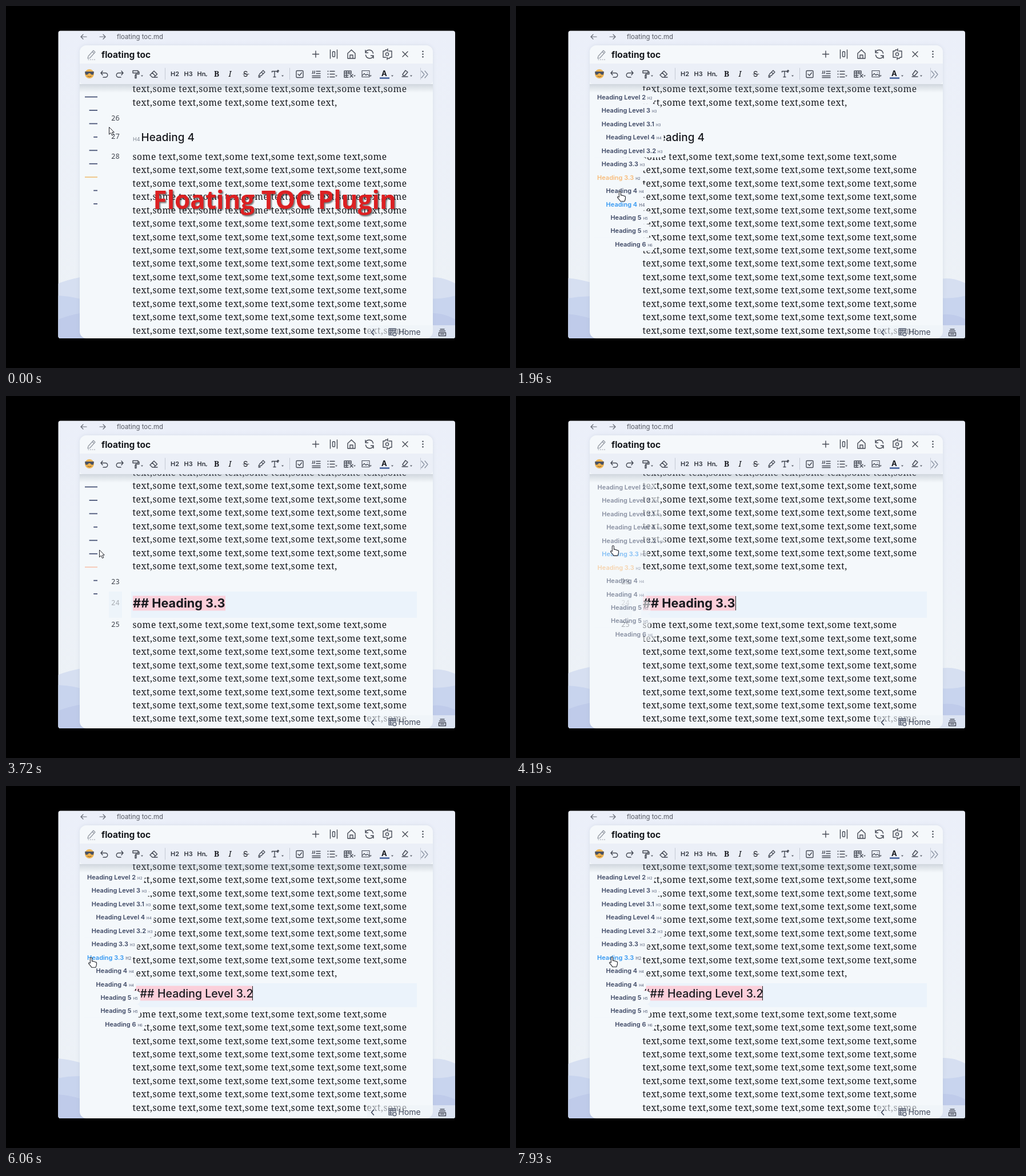
Recreate the animation shown at these times as an HTML page. Size 882 px wide and 635 px high, loop 8 s.

```html
<!DOCTYPE html>
<html lang="en">
<head>
<meta charset="utf-8">
<title>Floating TOC</title>
<style>
  html, body { margin: 0; width: 100%; height: 100%; overflow: hidden; background: #000; }
  svg { display: block; width: 882px; height: 635px; }
  text { font-family: Inter, sans-serif; fill: #17191e; white-space: pre; }
  .body { font: 15.6px "Noto Serif", serif; letter-spacing: .54px; }
  .num { font: 12.4px "Noto Sans Mono", monospace; fill: #41464f; }
  .dim { fill: #aaaeb4; }
  .h2 { font-size: 21.7px; font-weight: 700; }
  .h3 { font-size: 19.5px; font-weight: 500; }
  .h4 { font-size: 19px; font-weight: 500; }
  .tag { font-size: 9px; fill: #7b828e; }
  .icons { fill: none; stroke: #454a55; stroke-width: 1.4; stroke-linecap: round; stroke-linejoin: round; }
  .tool { font-size: 11px; font-weight: 600; fill: #30353e; }
  .serif { font-family: "Noto Serif", serif; }
  .label { font-size: 11px; font-weight: 600; }
  .title { font: 700 44px "Open Sans", sans-serif; fill: #dc2022; filter: drop-shadow(2px 2px 1.2px rgba(40, 40, 40, .65)); }
</style>
</head>
<body>
<svg viewBox="0 0 882 635">
  <defs>
    <linearGradient id="sky" x2="0" y2="1"><stop stop-color="#ebeff9"/><stop offset="1" stop-color="#edf2f6"/></linearGradient>
    <linearGradient id="shade" x2="0" y2="1"><stop stop-color="#8590a0" stop-opacity=".32"/><stop offset="1" stop-color="#8590a0" stop-opacity="0"/></linearGradient>
    <clipPath id="win"><rect x="91.500" y="43.500" width="694.500" height="539.500" rx="4"/></clipPath>
    <clipPath id="page"><path d="M129 137H747V571a12 12 0 0 1-12 12H141a12 12 0 0 1-12-12Z"/></clipPath>
    <filter id="soft" x="-5%" y="-5%" width="110%" height="110%"><feGaussianBlur stdDeviation="3"/></filter>
  </defs>
  <rect width="882" height="635"/>
  <g clip-path="url(#win)">
    <rect x="91" y="43" width="696" height="541" fill="url(#sky)"/>
    <g id="waves"></g>
    <rect x="129" y="69" width="618" height="514" rx="12" fill="#a9b4c8" opacity=".3" filter="url(#soft)"/>
    <rect x="129" y="69" width="618" height="514" rx="12" fill="#f4f8fb"/>
    <g clip-path="url(#page)">
      <g id="views"></g>
      <g id="toc"></g>
      <rect x="129" y="137" width="618" height="15" fill="url(#shade)"/>
    </g>
    <path d="M129 101H747V131a6 6 0 0 1-6 6H135a6 6 0 0 1-6-6Z" fill="#ebeff7"/>
    <path d="M129 101V81a12 12 0 0 1 12-12H735a12 12 0 0 1 12 12V101Z" fill="#f5f8fb"/>
    <path d="M632 583V567a7 7 0 0 1 7-7H786V583Z" fill="#eff3f9" opacity=".6"/>

    <g class="icons">
      <g stroke="#666b76" stroke-width="1.2">
        <path d="M141 54h-10m4-4-4 4 4 4M164 54h10m-4-4 4 4-4 4"/>
        <path stroke="#9298a2" d="m143 92 1-4 9-10 3 3-9 10-4 1m8-12 3 3"/>
        <path stroke="#9298a2" stroke-dasharray="1 2.5" d="M144 94h13"/>
      </g>
      <path d="M536.500 84.500h11m-5.500-5.500v11"/>
      <path d="M567.500 77v15m12-15v15"/><rect x="571.500" y="80" width="4" height="9" rx="1"/>
      <path d="M598 83l6.500-6 6.500 6v9h-13Zm4 9v-6h5v6"/>
      <path d="M629 77.500v4.500h4.500M629 82a7 7 0 0 1 13.500 1M643 91.500V87h-4.500M643 87a7 7 0 0 1-13.500-1"/>
      <path d="M665 90h-5v-11h3l1-2h4m2 2h5v11h-3l-1 2h-4m0-2v4m1-19v4"/><circle cx="667" cy="84.500" r="2.600"/>
      <path d="m694 80 9 9m0-9-9 9"/>
      <path stroke-width="2.600" d="M729.500 79.800v.01m0 4.700v.01m0 4.700v.01"/>

      <path d="m169 114-3 3.500 3 3.500m-3-3.500h8a3.700 3.700 0 0 1 0 7.500h-4M202 114l3 3.500-3 3.500m3-3.500h-8a3.700 3.700 0 0 0 0 7.500h4"/>
      <path d="M222 113.500h9v4h-9Zm9 2h2v4h-6v2m-1 0h2v5h-2Z"/>
      <path d="m252 121 7-7 5.500 5.500-5.500 5.500h-3Zm4-4 5 5.500m-2 2.500h6"/>
      <path stroke="#c3c9d4" stroke-width="1" d="M278.500 109v20M496.500 109v20M725.500 109v20"/>
      <path d="m442 123 2-4 6-6 3 3-6 6-3 1Zm5-7 3 3m-8 6h3"/>
      <rect x="508" y="113.500" width="12" height="12" rx="1.500"/><path d="m511 119.500 2.500 2.500 4-5"/>
      <path d="M543 114.500h7m-7 4h7m-14 4h14m-14 3h14M537 114v3l-1 1.500m4-4.500v3l-1 1.500"/>
      <path d="M567 114.500h8m-8 5h8m-8 5h8"/><path stroke-width="2" d="M563.500 114.500v.01m0 5v.01m0 5v.01"/>
      <path d="M604 119v-5h-12v11h7m-7-7.500h12m-12 4h7m-3-7.500v11m4-11v5m2 1 5 5m0-5-5 5"/>
      <path stroke-width="1.100" d="M623 113.500h13v11h-13Zm0 9 4-4 3 3 2-2 4 3M632.500 116.500h.1"/>
      <path d="m694 120 5-7 4 3-5 6h-3Zm-1 4h10"/>
      <path stroke="#8d95a5" d="m727 114 5 6-5 6m6-12 5 6-5 6"/>
      <path stroke="#3e5c9a" stroke-width="2.600" stroke-linecap="butt" d="M654 126.500h17"/>
      <path stroke-width="1.200" d="M415 119.500h10"/>
      <path d="M465.500 116v-1.500h9v1.500m-4.500-1.500v10m-2 0h4m4-8v-4m-1.500 1.500 1.500-1.500 1.500 1.500"/>
      <path stroke="#3e465c" stroke-width="1.600" d="m643.500 568-4 4.500 4 4.500"/>
      <path stroke="#596174" d="M682 571v-5h-12v11h6m-6-7.500h12m-12 4h6m-3-7.500v11m4-11v5"/>
      <circle cx="680" cy="575.500" r="3" stroke="#596174"/>
      <path d="M760 567h7m-8.500 3h10m-11 3h12v5.500h-12Zm3 2.500h6"/>
    </g>
    <g id="carets" fill="#5b606b"></g>
    <circle cx="146" cy="119" r="8" fill="#efb452"/>
    <path d="M138 115h16l-1 5q-3 2-6-2h-2q-3 4-6 2Z" fill="#4b5364"/>
    <path d="M142.500 123q3.500 2.500 7 0" fill="none" stroke="#81562c"/>
    <text x="194" y="58.300" font-size="11.400" style="fill:#565a63">floating toc.md</text>
    <text x="167" y="91" font-size="15.500" font-weight="700">floating toc</text>
    <text class="tool" x="288" y="123.300">H2</text><text class="tool" x="311.500" y="123.300">H3</text><text class="tool" x="334.500" y="123.300">Hn</text>
    <text class="serif" x="364" y="124" font-size="13.500" font-weight="700">B</text>
    <text class="serif" x="389.500" y="124" font-size="13.500" font-style="italic">I</text>
    <text x="415" y="124" font-size="13">S</text>
    <text x="657" y="122.500" font-size="13" font-weight="700">A</text>
    <text x="686.500" y="577" font-size="14" style="fill:#454c5d">Home</text>
    <text id="title" class="title" x="257.500" y="356">Floating TOC Plugin</text>
    <g id="cursor" fill="#fff" stroke="#20232a" stroke-linejoin="round">
      <path id="arrow" d="M.5.500V13.200l3-2.800 2 4.600 2.300-1-2-4.500H9.300Z"/>
      <path id="hand" transform="scale(1.080)" d="M-1.500 1.600a1.400 1.400 0 0 1 2.800 0V6.500l1-.4 1.800.9 1-.2 1.500 1 1-.1q1.500.4 1.300 2.600-.1 3.200-1.600 6.200H1Q-1.400 13-4 10.200q-.6-2.400 2.500-.8Z"/>
    </g>
  </g>
</svg>
<script>
const LOOP = 8000, STEP = 23.45, JUMP1 = 2680, JUMP2 = 4560, BLINK = 530;
const $ = id => document.getElementById(id);

function add(parent, tag, attrs, content) {
  const el = document.createElementNS(parent.namespaceURI, tag);
  for (const k in attrs) el.setAttribute(k, attrs[k]);
  if (content) el.textContent = content;
  return parent.appendChild(el);
}
const show = (el, on) => el.setAttribute('visibility', on ? 'visible' : 'hidden');
const ramp = (t, a, b) => Math.min(1, Math.max(0, (t - a) / (b - a)));
const mix = (a, b, u) => a.map((v, i) => v + (b[i] - v) * u);
const smooth = u => u * u * (3 - 2 * u);
const outBack = u => 1 + 2.7 * (u - 1) ** 3 + 1.7 * (u - 1) ** 2;

// Document
const FULL = 'text,some '.repeat(6).trim();
const OPENING = 'some text,'.repeat(5) + 'some';
const ENDING = 'text,some '.repeat(4) + 'text,';

function lines(view, y, count, first, last) {
  for (let i = 0; i < count; i++) {
    const str = i === 0 && first || i === count - 1 && last || FULL;
    add(view, 'text', { class: 'body', x: 221.5, y: y + 5 + i * STEP }, str);
  }
}
function number(view, y, n, dim) {
  add(view, 'text', { class: dim ? 'num dim' : 'num', x: 184, y: y + 4.5 }, n);
}
function pink(view, x, width) {
  return add(view, 'rect', { x, y: 350.5, width, height: 26, fill: '#fbcfda' });
}
function activeLine(view, y, height) {
  add(view, 'rect', { x: 180, y, width: 23, height, fill: '#edf4fa' });
  add(view, 'rect', { x: 219, y, width: 500, height, fill: '#ebf3fb' });
}
function heading(view, cls, x, str) {
  return add(view, 'text', { class: cls, x, y: 370.5 }, str);
}
function caret(view, x) {
  return add(view, 'rect', { x, y: 351, width: 1, height: 25, fill: '#222' });
}

const views = [0, 1, 2].map(() => add($('views'), 'g', {}));
const [viewA, viewB, viewC] = views;

lines(viewA, 146.3, 2, null, ENDING);
number(viewA, 196, 26);
number(viewA, 228.5, 27);
number(viewA, 263, 28);
add(viewA, 'text', { class: 'tag', x: 222, y: 236.5 }, 'H4');
add(viewA, 'text', { class: 'h4', x: 236.5, y: 237 }, 'Heading 4');
lines(viewA, 264.8, 14, OPENING);

lines(viewB, 135, 8, null, ENDING);
activeLine(viewB, 343, 46);
pink(viewB, 222, 162);
number(viewB, 325, 23);
number(viewB, 362, 24, true);
number(viewB, 400, 25);
heading(viewB, 'h2', 222, '## Heading 3.3');
lines(viewB, 402.3, 8, OPENING);

lines(viewC, 141.6, 9, null, ENDING);
activeLine(viewC, 346, 42);
pink(viewC, 266, 166);
const hashes = [pink(viewC, 222, 44), heading(viewC, 'h3', 222, '###')];
number(viewC, 362.5, 19, true);
number(viewC, 399, 20);
heading(viewC, 'h3', 265, 'Heading Level 3.2');
lines(viewC, 400.6, 8, OPENING);

const caretB = caret(viewB, 384), caretC = caret(viewC, 431);

for (const x of [238, 350.5, 484, 578, 610, 638, 676, 709])
  add($('carets'), 'path', { d: `M${x - 2} 121.500h4l-2 2.500Z` });

// Floating table of contents
const ACTIVE = 6;
const bars = add($('toc'), 'g', {}), labels = add($('toc'), 'g', {});
const rows = [
  ['Level 2', 2], ['Level 3', 3], ['Level 3.1', 3], ['Level 4', 4], ['Level 3.2', 3], ['3.3', 3],
  ['3.3', 2], ['4', 4], ['4', 4], ['5', 5], ['5', 5], ['6', 6]
].map(([name, level], i) => {
  const y = 160 + i * STEP, x = 142 + (level - 2) * 7.8;
  const back = add(labels, 'rect', { x: 130, y: y - 11.8, height: 23.6, rx: 7, fill: '#f4f8fb' });
  const label = add(labels, 'text', { class: 'label', x, y: y + 3.9 }, 'Heading ' + name);
  const end = x + label.getComputedTextLength() + 3;
  const tag = add(labels, 'text', { x: end, y: y + 3.9 }, 'H' + level);
  back.setAttribute('width', end + 12.5 - 130);
  const bar = add(bars, 'rect', { y: y - 1.4, height: 1.8, fill: '#4a5578' });
  return { label, tag, bar, width: 22 - (level - 2) * 7.6 };
});

// Opening and closing times of the panel.
const OPEN = [[340, 2710], [3970, 4580], [5490, 9000]];
const overPanel = t => OPEN.some(([a, b]) => t >= a && t < b + 250);

function drawToc(t) {
  let alpha = 0, grow = 1, slide = 0;
  for (const [a, b] of OPEN) {
    alpha += ramp(t, a + 80, a + 320) * (1 - ramp(t, b, b + 120));
    grow += ramp(t, b + 120, b + 340) - ramp(t, a, a + 120);
    if (t >= a) slide = 24 * (outBack(ramp(t, a, a + 560)) - 1);
  }
  // The highlight follows the pointer a little late.
  const hover = overPanel(t) ? Math.round((pointer(t - 120)[1] - 160) / STEP) : -1;
  labels.setAttribute('opacity', alpha);
  labels.setAttribute('transform', `translate(${slide})`);
  rows.forEach(({ label, tag, bar, width }, i) => {
    const w = Math.max(0, width - 22 * (1 - grow));
    bar.setAttribute('x', 160 - w);
    bar.setAttribute('width', w);
    label.style.fill = i === hover ? '#3598f2' : i === ACTIVE ? '#f8bb79' : '#3c4764';
    tag.style.fill = '#4b5570';
    tag.style.fontSize = i === hover ? '7.4px' : '6.2px';
  });
  rows[ACTIVE].bar.setAttribute('fill', t < JUMP1 ? '#f0c27e' : '#f7c6b2');
}

// Background waves: four shapes, one second each, given by heights at the visible edges.
const SHAPES = [[487, 476, 476, 487], [484, 474, 482, 473], [477, 485, 478, 487], [495, 485, 490, 490]];
const waves = [['#d6dff1', 481, 1], ['#c8d4ee', 511, -.5], ['#bfcbea', 544, 1]]
  .map(([fill, base, scale]) => ({ base, scale, path: add($('waves'), 'path', { fill }) }));

function drawWaves(t) {
  const k = Math.floor(t / 1000);
  const shape = mix(SHAPES[k % 4], SHAPES[(k + 1) % 4], t / 1000 - k);
  for (const { base, scale, path } of waves) {
    const [a, b, c, d] = shape.map(y => base + (y - 481) * scale);
    path.setAttribute('d', `M91 ${a}Q110 ${(a + b) / 2 - 2} 129 ${b}L747 ${c}Q766 ${(c + d) / 2 - 6 * scale} 787 ${d}V584H91Z`);
  }
}

// Pointer stops: time, x, y
const STOPS = [
  [60, 180, 212], [660, 157, 305.5], [1560, 157, 305.5], [1800, 182, 342], [1960, 182, 325],
  [2180, 180, 301], [JUMP1, 180, 301], [3010, 178, 83], [3150, 178, 83], [3720, 163, 269.5],
  [3950, 163, 269.5], [4410, 176, 256], [5450, 176, 256], [5960, 149, 300.5], [6430, 149, 300.5],
  [7690, 168, 299.5]
];
function pointer(t) {
  const i = STOPS.findIndex(s => s[0] > t);
  if (i < 1) return STOPS.at(i).slice(1);
  const a = STOPS[i - 1], b = STOPS[i];
  return mix(a, b, smooth(ramp(t, a[0], b[0]))).slice(1);
}

function draw(t) {
  drawWaves(t);
  drawToc(t);
  const current = (t >= JUMP1) + (t >= JUMP2);
  views.forEach((v, i) => v.setAttribute('display', i === current ? 'inline' : 'none'));
  const blink = from => Math.floor((t - from) / BLINK) % 2 === 0;
  show(caretB, blink(JUMP1));
  show(caretC, blink(JUMP2));
  hashes.forEach(el => show(el, t >= JUMP2 + 290));
  show($('title'), t < 1740);
  $('cursor').setAttribute('transform', `translate(${pointer(t)})`);
  show($('hand'), overPanel(t));
  show($('arrow'), !overPanel(t));
}

function tick() {
  draw(performance.now() % LOOP);
  requestAnimationFrame(tick);
}
tick();
</script>
</body>
</html>
```
